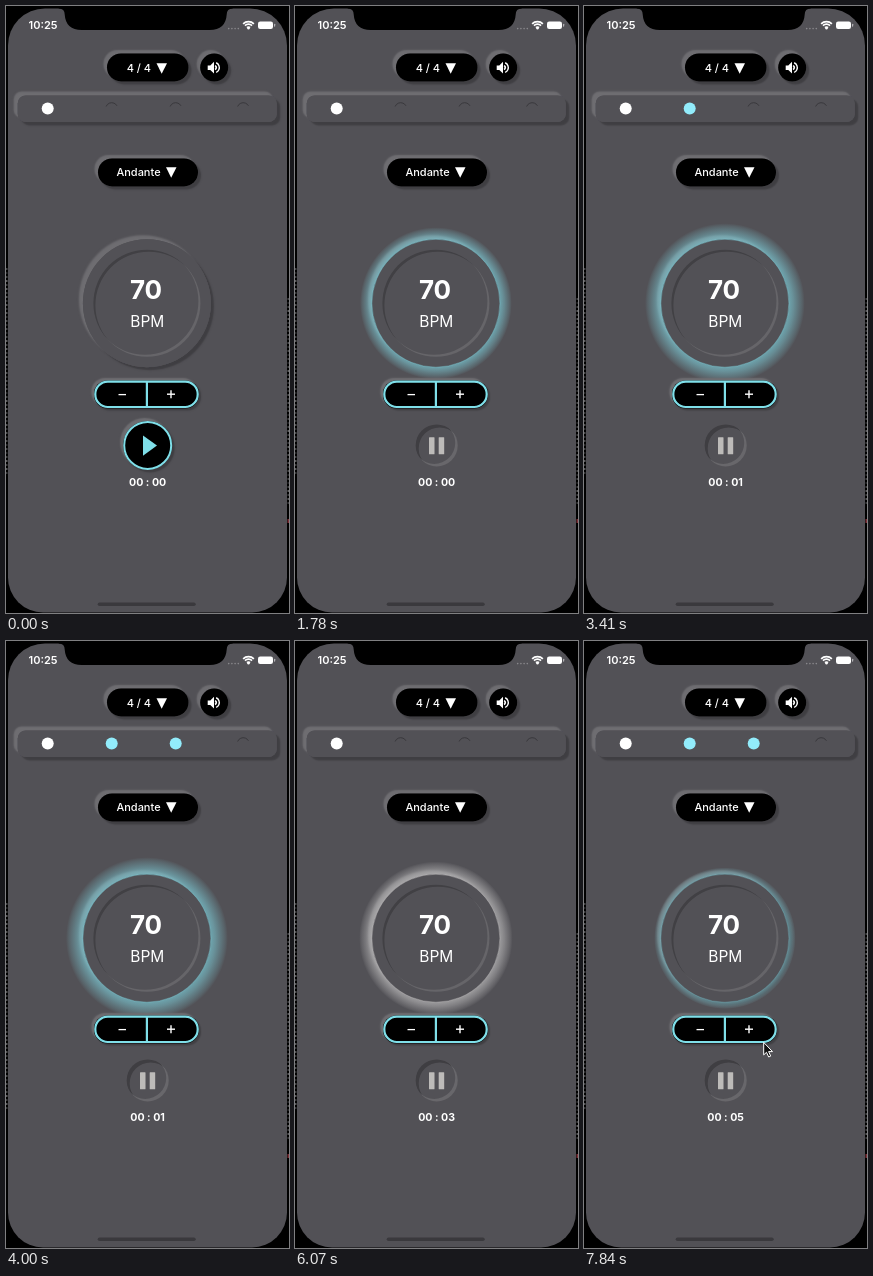
Animation of 283 by 607 pixels, one loop 7990 ms. Source, as an HTML page with a canvas:

```html
<!DOCTYPE html>
<html lang="en">
<head>
<meta charset="utf-8">
<title>Metronome</title>
<style>
html, body { margin: 0; width: 100%; height: 100%; overflow: hidden; background: #000; }
canvas { display: block; width: 283px; height: 607px; }
</style>
</head>
<body>
<canvas id="stage"></canvas>
<script>
const W = 283, H = 607, LOOP = 7990;
const FIRST = 600, STEP = 147.5;
const PRESS = 1190, BEAT = 60000 / 70, CLOCK = 2130;
const FACE = '#525156', LIGHT = '#6e6d71', DARK = '#3f3e42';
const CYAN = '#7fdfe9', DOT = '#92ecfb', WHITE = '#fff';
const FONT = 'Inter, Roboto, sans-serif';
const TAU = Math.PI * 2;

const canvas = document.getElementById('stage');
const ctx = canvas.getContext('2d');
const dpr = window.devicePixelRatio || 1;
canvas.width = W * dpr;
canvas.height = H * dpr;

function circle(x, y, r) {
  const p = new Path2D();
  p.arc(x, y, r, 0, TAU);
  return p;
}

function pill(x, y, w, h, r) {
  const p = new Path2D();
  p.roundRect(x, y, w, h, r);
  return p;
}

function fill(path, color) {
  ctx.fillStyle = color;
  ctx.fill(path);
}

function shadow(path, color, offset, blur) {
  ctx.save();
  ctx.shadowColor = color;
  ctx.shadowOffsetX = ctx.shadowOffsetY = offset * dpr;
  ctx.shadowBlur = blur * dpr;
  fill(path, FACE);
  ctx.restore();
}

// Soft raised surface, lit from the top left
function raised(path, color, offset = 3.5) {
  shadow(path, DARK, offset - 0.5, 1.5);
  shadow(path, LIGHT, -offset, 1.5);
  fill(path, color);
}

function crescent(x, y, r, shift, color) {
  ctx.save();
  ctx.clip(circle(x, y, r));
  const p = circle(x + shift, y + shift, r);
  p.rect(0, 0, W, H);
  ctx.fillStyle = color;
  ctx.fill(p, 'evenodd');
  ctx.restore();
}

function text(s, x, y, size, weight, align = 'center', color = WHITE) {
  ctx.font = `${weight} ${size}px ${FONT}`;
  ctx.textAlign = align;
  ctx.fillStyle = color;
  ctx.fillText(s, x, y);
}

function poly(color, ...pts) {
  ctx.beginPath();
  for (let i = 0; i < pts.length; i += 2) ctx.lineTo(pts[i], pts[i + 1]);
  ctx.closePath();
  ctx.fillStyle = color;
  ctx.fill();
}

function line(color, width, x1, y1, x2, y2) {
  ctx.beginPath();
  ctx.moveTo(x1, y1);
  ctx.lineTo(x2, y2);
  ctx.strokeStyle = color;
  ctx.lineWidth = width;
  ctx.stroke();
}

function arc(color, width, x, y, r, from, to) {
  ctx.beginPath();
  ctx.arc(x, y, r, from, to);
  ctx.strokeStyle = color;
  ctx.lineWidth = width;
  ctx.stroke();
}

function drawBackdrop() {
  ctx.fillStyle = '#000';
  ctx.fillRect(0, 0, W, H);
  for (let y = 262; y < 470; y += 4) {
    const v = 35 + (y * 37) % 60;
    ctx.fillStyle = `rgb(${v},${v},${v + 2})`;
    ctx.fillRect(0, y, 1.5, 2);
    ctx.fillRect(281.5, y + 30, 1.5, 2);
  }
  ctx.fillStyle = '#7c3038';
  ctx.fillRect(281.5, 513, 1.5, 4);
}

function drawPhone() {
  fill(pill(2.3, 2, 279, 604, [37, 37, 35, 35]), FACE);
  fill(new Path2D('M53 -1V2Q59 2 59 8Q60 23.5 76 23.5H204Q220 23.5 221 8Q221 2 227 2V-1Z'), '#000');
  fill(pill(92, 596.2, 98, 3.5, 2), '#3a393d');
}

function drawStatus() {
  text('10:25', 22.8, 22.6, 11, 600, 'left');
  for (let i = 0; i < 4; i++) fill(circle(223 + i * 3.2, 22.2, 0.8), '#8b8a8e');
  for (const r of [2.2, 5, 7.6]) arc(WHITE, 1.7, 242.8, 22.8, r, -Math.PI * 0.75, -Math.PI * 0.25);
  fill(circle(242.8, 21.8, 1.2), WHITE);
  fill(pill(252.3, 15, 15, 7.6, 2.2), WHITE);
  fill(pill(268.3, 17.3, 1.2, 3, 0.6), '#b5b4b7');
}

function drawHeader() {
  raised(pill(101.3, 47, 81.5, 28, 14), '#000');
  text('4 / 4', 133.2, 65.2, 11, 500);
  poly(WHITE, 150.8, 56.8, 161.3, 56.8, 156, 67.3);

  raised(circle(208.5, 61.2, 14), '#000');
  poly(WHITE, 202, 59, 204.6, 59, 208.3, 55.3, 208.3, 67.1, 204.6, 63.5, 202, 63.5);
  arc(WHITE, 1.6, 208.3, 61.2, 2.2, -1.1, 1.1);
  arc(WHITE, 1.4, 208.3, 61.2, 5.3, -1.15, 1.15);

  raised(pill(92.3, 152, 100, 28, 14), '#000');
  text('Andante', 132.8, 169.6, 11, 500);
  poly(WHITE, 160.3, 160.8, 170.8, 160.8, 165.5, 171.3);
}

function drawBeats(lit) {
  raised(pill(12, 89, 259, 26.5, 8), FACE, 4);
  [42, 106, 170, 237.5].forEach((x, i) => {
    if (i < lit) fill(circle(x, 102, 6), i ? DOT : WHITE);
    else arc('#39383c', 1, x, 102.3, 6, -Math.PI * 0.88, -Math.PI * 0.16);
  });
}

function drawDial(glow, rgb) {
  const x = 141.2, y = 296.8, r = 64;
  const disc = circle(x, y, r);
  const strength = Math.min(1, glow / 6);
  ctx.globalAlpha = 1 - 0.85 * strength;
  shadow(disc, DARK, 3, 1.5);
  ctx.globalAlpha = 1;
  shadow(disc, LIGHT, -4, 2);

  if (glow > 0) {
    const outer = r + glow + 3;
    const g = ctx.createRadialGradient(x, y, r - 1, x, y, outer);
    const stops = [[0, 0.64], [0.25, 0.5], [0.55, 0.31], [0.85, 0.12], [1, 0]];
    for (const [at, a] of stops) g.addColorStop(at, `rgba(${rgb},${a * (0.4 + 0.6 * strength)})`);
    fill(circle(x, y, outer), g);
  }
  fill(disc, FACE);
  if (glow > 0) arc(`rgba(${rgb},${0.35 * strength})`, 1, x, y, r, 0, TAU);

  crescent(x, y, 53.5, 2, '#414044');
  crescent(x, y, 53.5, -2, '#666569');
  text('70', 140.3, 292.8, 26, 700);
  text('BPM', 141.6, 320.8, 15.5, 400);
}

function drawStepper() {
  raised(pill(88.3, 374, 105, 28, 13.5), '#000', 2.5);
  ctx.strokeStyle = CYAN;
  ctx.lineWidth = 2.2;
  ctx.stroke(pill(89.6, 375.2, 102.4, 25.4, 12.5));
  line(CYAN, 2.2, 141.2, 375, 141.2, 401);
  line(WHITE, 1.3, 112.8, 388.2, 120.3, 388.2);
  line(WHITE, 1.4, 161.3, 387.8, 169.3, 387.8);
  line(WHITE, 1.4, 165.3, 383.8, 165.3, 391.8);
}

function drawButton(playing) {
  const x = 142, y = 439;
  if (playing) {
    crescent(x, y, 21, 3, DARK);
    crescent(x, y, 21, -2.5, '#68676b');
    fill(pill(134.3, 430.8, 5.5, 17, 0.5), '#bdbbb9');
    fill(pill(144, 430.8, 5.5, 17, 0.5), '#bdbbb9');
  } else {
    raised(circle(x, y, 24.5), '#000', 3);
    arc(CYAN, 2, x, y, 23.5, 0, TAU);
    poly(CYAN, 137.3, 429, 151.3, 439, 137.3, 449.3);
  }
}

function drawPointer(x, y) {
  const p = new Path2D('M0 0V12.5L2.8 9.9L5 14.6L7 13.7L4.9 9.2H8.8Z');
  ctx.save();
  ctx.translate(x, y);
  fill(p, '#111');
  ctx.strokeStyle = WHITE;
  ctx.lineWidth = 1;
  ctx.stroke(p);
  ctx.restore();
}

function glowAt(phase, accent) {
  const end = accent ? 700 : 660;
  if (phase >= end) return 0;
  const size = accent ? 12 : 14;
  return size * Math.min(1, (phase + 30) / 150) * (1 - (phase / end) ** 9);
}

function render(time) {
  const t = time < FIRST ? 0 : FIRST + Math.floor((time - FIRST) / STEP) * STEP;
  const playing = t >= PRESS;
  const beat = Math.floor((t - PRESS) / BEAT);
  const phase = (t - PRESS) - beat * BEAT;

  // Beat zero is the lead-in; the bar starts on the next one
  const count = beat > 0 ? (beat - 1) % 4 + 1 : 1;
  const accent = beat > 0 && count === 1;
  const secs = Math.max(0, Math.floor((t - CLOCK) / 1000));

  ctx.setTransform(dpr, 0, 0, dpr, 0, 0);
  drawBackdrop();
  ctx.translate(-0.3, 0.4);
  drawPhone();
  drawStatus();
  drawHeader();
  drawBeats(count);
  drawDial(playing ? glowAt(phase, accent) : 0, accent ? '205,204,204' : '130,218,230');
  drawStepper();
  drawButton(playing);
  text('00 : ' + String(secs).padStart(2, '0'), 141.9, 479.8, 10.6, 700);
  if (t > 7670) {
    const left = Math.max(0, 7827 - t) / STEP;
    drawPointer(180 + 8 * left, 401 + 8 * left);
  }
}

const begin = performance.now();
function tick() {
  render((performance.now() - begin) % LOOP);
  requestAnimationFrame(tick);
}
tick();
</script>
</body>
</html>
```
